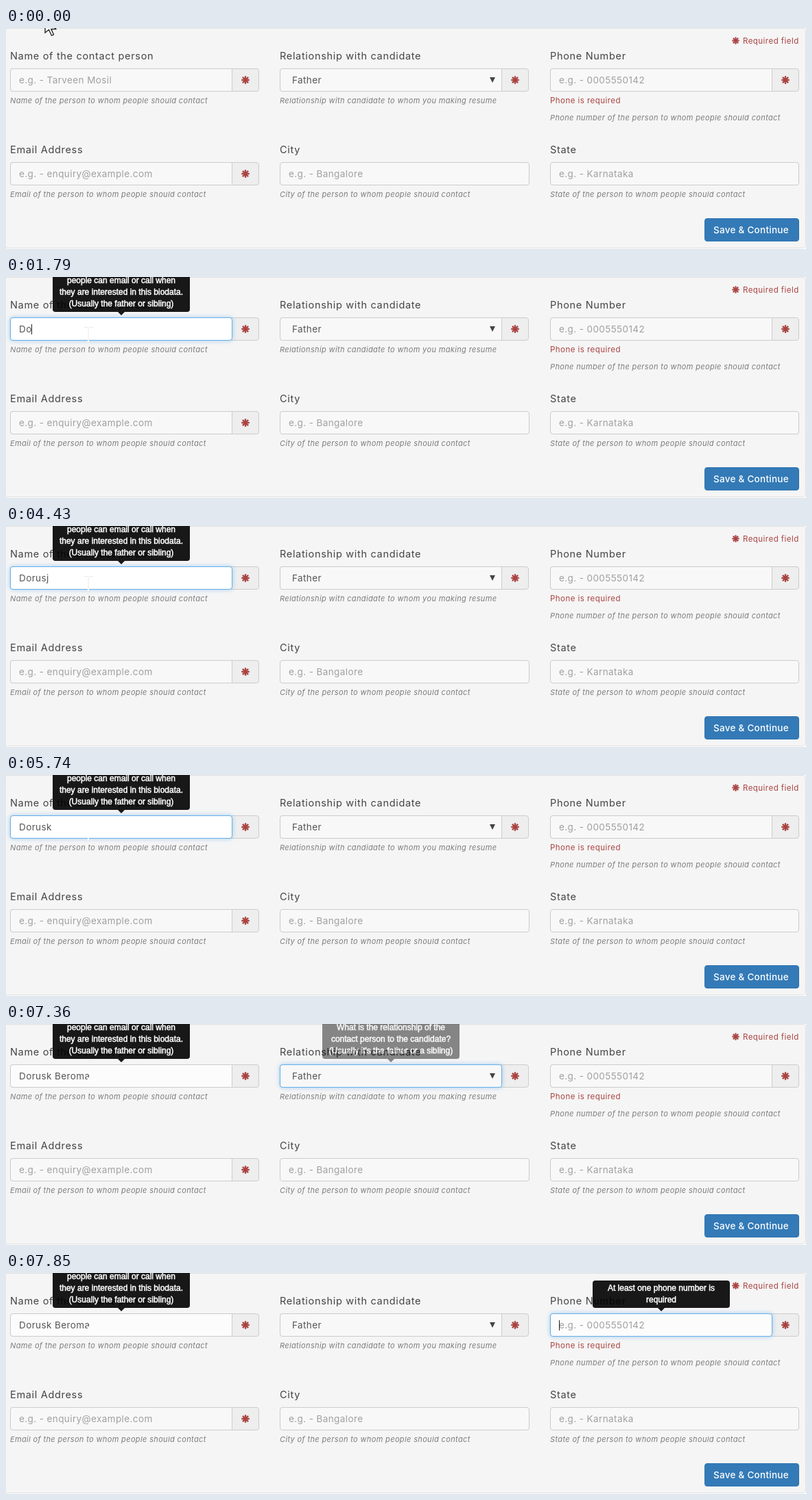
Animation, 1166 px wide and 323 px high, one loop 8 s. Source, as an HTML page:

```html
<!DOCTYPE html>
<html lang="en">
<head>
<meta charset="utf-8">
<title>Contact form</title>
<style>
html, body { margin: 0; width: 100%; height: 100%; overflow: hidden; background: #fff; }
svg { display: block; }
text { font-family: Inter, "Open Sans", sans-serif; white-space: pre; }
.label { font-size: 14.5px; letter-spacing: .68px; fill: #444; }
.value { font-size: 13.5px; letter-spacing: .4px; fill: #555; }
.hint { font-size: 13.5px; letter-spacing: .4px; fill: #a0a0a0; }
.help { font-size: 11px; letter-spacing: .36px; font-style: italic; fill: #7c7c7c; }
.error { font-size: 11.5px; letter-spacing: .46px; fill: #a94442; }
.button { font-size: 13.5px; letter-spacing: .26px; font-weight: 500; fill: #fff; }
.tip { font: 12px "Liberation Sans", Arial, sans-serif; fill: #fff; stroke: #fff; stroke-width: .5px; text-anchor: middle; }
.focus { stroke: #66afe9; filter: drop-shadow(0 0 3px rgba(102, 175, 233, .6)); }
</style>
</head>
<body>
<svg id="stage" width="1166" height="323" viewBox="0 0 1166 323"></svg>
<script>
const LOOP = 8000;
const stage = document.getElementById('stage');
const pen = document.createElement('canvas').getContext('2d');
pen.font = '13.5px Inter, "Open Sans", sans-serif';
const textWidth = s => pen.measureText(s).width + .4 * s.length;

const COLS = [6, 399, 793];
const FIRST = 'Dorusk';

// [time, typed text, caret visible]
const TYPING = [
  [0, '', 0], [480, '', 1], [970, '', 0], [1300, 'D', 1], [1630, 'Do', 1],
  [2290, 'Dor', 1], [2450, 'Doru', 1], [2610, 'Dorus', 1], [2940, 'Dorus', 0],
  [3270, 'Dorus', 1], [3770, 'Dorus', 0], [3930, 'Dorusj', 1], [4430, 'Dorusj', 0],
  [4760, 'Dorus', 1], [5240, FIRST, 1], [5740, FIRST, 0], [5900, FIRST + ' ', 1],
  [6230, FIRST + ' B', 1], [6390, FIRST + ' Be', 1], [6550, FIRST + ' Ber', 1],
  [6710, FIRST + ' Berom', 1], [6870, FIRST + ' Beroma', 1], [7200, FIRST + ' Beroma', 0]
];

const text = (cls, x, y, s) => `<text class="${cls}" x="${x}" y="${y}">${s}</text>`;

function asterisk(x, y, r = 5.8) {
  const arms = [0, 45, 90, 135].map(a => `<path d="M${-r} 0H${r}" transform="rotate(${a})"/>`);
  return `<g transform="translate(${x} ${y})" stroke="#a94442" stroke-width="${r * .4}">${arms.join('')}</g>`;
}

function box(x, y, w, fill, focused) {
  return `<rect class="${focused ? 'focus' : ''}" x="${x + .5}" y="${y + .5}" width="${w}" height="33" rx="3.5" fill="${fill}" stroke="#ccc"/>`;
}

function field(col, y, label, help, { required, focused, fill = '#f8f8f8', helpDrop = 51, width = 362 }) {
  const x = COLS[col];
  let out = text('label', x, y - 13, label) + text('help', x, y + helpDrop, help);
  if (!required) return out + box(x, y, width, fill);
  out += box(x, y, width, '#eee') + asterisk(x + 343, y + 17);
  if (focused) return out + box(x, y, 323, fill, true);
  return out + `<path d="M${x + 323.5} ${y + .5}H${x + 4}a3.5 3.5 0 0 0 -3.5 3.5v26a3.5 3.5 0 0 0 3.5 3.5H${x + 323.5}z" fill="${fill}" stroke="#ccc"/>`;
}

function tooltip(cx, top, lines, opacity) {
  if (!opacity) return '';
  const rows = lines.map((s, i) => text('tip', cx, 43 - 17 * (lines.length - 1 - i), s)).join('');
  return `<g opacity="${opacity}"><path d="M${cx - 5} 51h10l-5 5z" opacity=".9"/>
    <rect x="${cx - 100}" y="${top}" width="200" height="${51 - top}" rx="4" opacity=".9"/>${rows}</g>`;
}

const caret = x => `<path d="M${x} 69v15" stroke="#222"/>`;

function squiggle(x, width) {
  return `<path d="M${x} 84${'l2 -2l2 2'.repeat(Math.round(width / 4))}" fill="none" stroke="#e03030" stroke-width=".9"/>`;
}

function pointer(t) {
  if (t < 320) {
    const [x, y] = t < 160 ? [57, -14.6] : [88, 18];
    return `<path transform="translate(${x} ${y}) scale(1.35)" d="M0 0V16L4 12.6L7 19L9.3 18L6.5 12H11.7z" fill="#fff" stroke="#111" stroke-width=".9"/>`;
  }
  const stem = `<path d="M120 78V${t < 7360 ? 95 : 86}" stroke="#fff" stroke-width="2"/>`;
  return stem + (t < 5080 ? '<path d="M114 73.5h5M121 73.5h6M120 74v18" stroke="#e9e9e4"/>' : '');
}

function scene(t) {
  const [, typed, caretOn] = TYPING.findLast(step => step[0] <= t);
  const nameFocus = t >= 480 && t < 7360;
  const relationFocus = t >= 7360 && t < 7850;
  const phoneFocus = t >= 7850;
  const nameFill = t < 480 ? '#f8f8f8' : nameFocus ? '#fff' : '#fcfcfc';

  return `<rect x="-9.5" y=".5" width="1175" height="321" rx="4" fill="#f5f5f5" stroke="#e0e0e0"/>`
    + asterisk(1063.5, 18.5, 5.2) + text('error', 1074, 23, 'Required field')
    + field(0, 59, 'Name of the contact person', 'Name of the person to whom people should contact',
      { required: true, focused: nameFocus, fill: nameFill })
    + field(1, 59, 'Relationship with candidate', 'Relationship with candidate to whom you making resume',
      { required: true, focused: relationFocus })
    + field(2, 59, 'Phone Number', 'Phone number of the person to whom people should contact',
      { required: true, focused: phoneFocus, fill: phoneFocus ? '#fcfcfc' : '#f8f8f8', helpDrop: 76 })
    + field(0, 196, 'Email Address', 'Email of the person to whom people should contact', { required: true })
    + field(1, 196, 'City', 'City of the person to whom people should contact', { width: 363 })
    + field(2, 196, 'State', 'State of the person to whom people should contact', {})
    + text('error', 793, 110, 'Phone is required')
    + (typed ? text('value', 19, 81, typed) : text('hint', 19, 81, 'e.g. - Tarveen Mosil'))
    + text('value', 417, 81, 'Father') + '<path d="M705 72h8l-4 8z" fill="#444"/>'
    + text('hint', 806, 81, 'e.g. - 0005550142')
    + text('hint', 19, 218, 'e.g. - enquiry@example.com')
    + text('hint', 412, 218, 'e.g. - Bangalore')
    + text('hint', 806, 218, 'e.g. - Karnataka')
    + (t >= 5900 && nameFocus ? squiggle(19, textWidth(FIRST)) : '')
    + (caretOn ? caret(Math.floor(19 + textWidth(typed)) + .5) : '')
    + (phoneFocus ? caret(806.5) : '')
    + '<rect x="1018.5" y="278.5" width="137" height="33" rx="3.5" fill="#337ab7" stroke="#3074b0"/>'
    + text('button', 1031, 300, 'Save &amp; Continue')
    + tooltip(168, -10, ['people can email or call when', 'they are interested in this biodata.',
      '(Usually the father or sibling)'], t < 480 ? 0 : t < 640 ? .5 : 1)
    + tooltip(561, -10, ['What is the relationship of the', 'contact person to the candidate?',
      "(Usually it's the father or a sibling)"], !relationFocus ? 0 : t < 7520 ? .5 : 1)
    + tooltip(955, 11, ['At least one phone number is', 'required'], phoneFocus ? 1 : 0)
    + pointer(t);
}

let shown = '';
function draw() {
  const next = scene(performance.now() % LOOP);
  if (next !== shown) stage.innerHTML = shown = next;
  requestAnimationFrame(draw);
}
draw();
</script>
</body>
</html>
```
